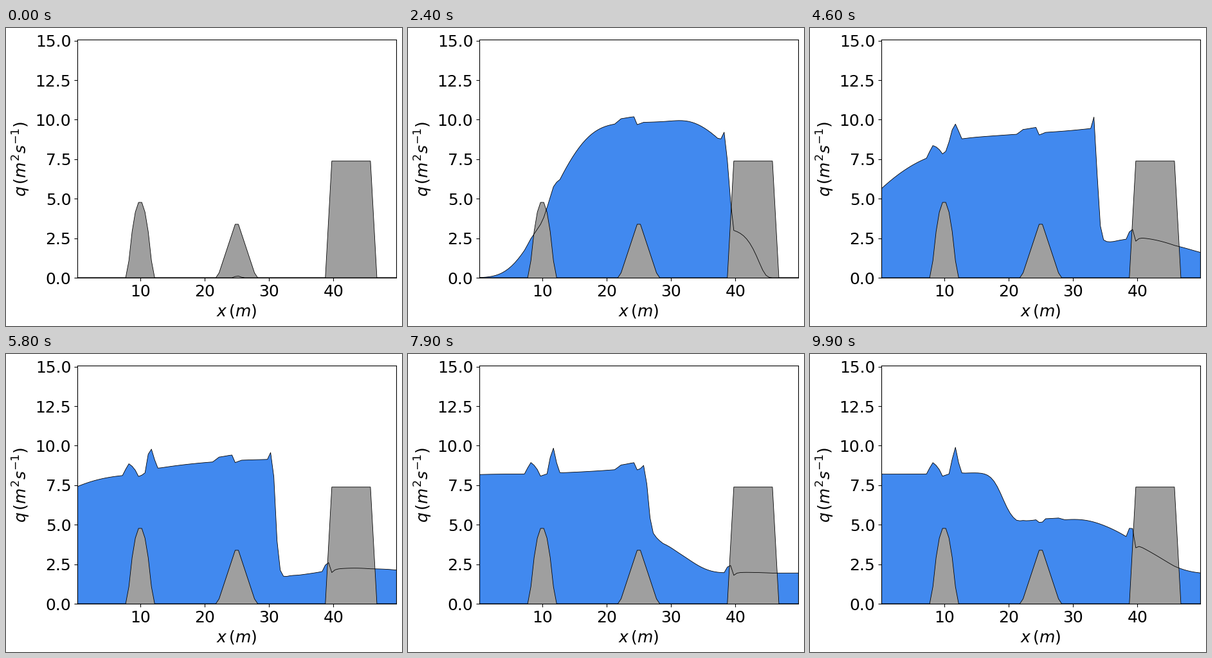
Animation of 616x463 px, one loop 10 s. Source, as a matplotlib script:

```python
"""Dam break over three obstacles: unit discharge from a 1D shallow water solver."""
import numpy as np
import matplotlib.pyplot as plt
from matplotlib.animation import FuncAnimation

W, H, DPI = 616, 463, 100
FRAMES, INTERVAL = 100, 100
G, MANNING, CFL, DRY = 9.80665, 0.02, 0.5, 1e-3
LENGTH, CELLS = 50.0, 100
DX = LENGTH / CELLS
BED_SCALE = 2.46
BLUE, GRAY = "#4189ef", "#9f9f9f"


def bed(x):
    return np.select(
        [(x > 8) & (x < 12), (x >= 22) & (x <= 28), (x > 39) & (x < 46.5)],
        [2 - 0.5 * (x - 10) ** 2, 1.5 - 0.5 * np.abs(x - 25), 3.0], 0.0)


def cell_mean(nodes):
    return (nodes[:-1] + nodes[1:]) / 2


def velocity(h, q):
    return np.where(h > DRY, q / np.maximum(h, DRY), 0.0)


def friction(h, q, dt):
    depth = np.maximum(h, DRY)
    u = velocity(h, q)
    drag = G * MANNING ** 2 / np.cbrt(depth) * np.abs(u)
    return q - dt * drag * u / (1 + 2 * dt * drag / depth)


def hll(hl, ul, hr, ur):
    """Mass and momentum flux between two states."""
    al, ar = np.sqrt(G * hl), np.sqrt(G * hr)
    a_mid = np.abs((al + ar) / 2 + (ul - ur) / 4)
    u_mid = (ul + ur) / 2 + al - ar
    sl = np.where(hl <= DRY, ur - 2 * ar, np.minimum(ul - al, u_mid - a_mid))
    sr = np.where(hr <= DRY, ul + 2 * al, np.maximum(ur + ar, u_mid + a_mid))
    wet = (hl > DRY) | (hr > DRY)
    width = np.where(sr - sl > 1e-9, sr - sl, 1.0)

    def flux(fl, fr, jump):
        mid = (sr * fl - sl * fr + sl * sr * jump) / width
        return np.where(wet, np.where(sl >= 0, fl, np.where(sr <= 0, fr, mid)), 0.0)

    ql, qr = hl * ul, hr * ur
    mass = flux(ql, qr, hr - hl)
    momentum = flux(ql * ul + G / 2 * hl ** 2, qr * ur + G / 2 * hr ** 2, qr - ql)
    return mass, momentum


def step(h, q, z, dt):
    hg, qg, zg = (np.pad(a, 1, mode="edge") for a in (h, q, z))
    qg = friction(hg, qg, dt)
    eta, u = hg + zg, velocity(hg, qg)

    # hydrostatic reconstruction at every face
    face = np.maximum(zg[:-1], zg[1:])
    hl = np.maximum(0, eta[:-1] - face)
    hr = np.maximum(0, eta[1:] - face)
    mass, momentum = hll(hl, u[:-1], hr, u[1:])

    z_east = np.minimum(face, eta[:-1])[1:]
    z_west = np.minimum(face, eta[1:])[:-1]
    slope = G * (hl[1:] + hr[:-1]) / 2 * (z_east - z_west)

    active = np.maximum(np.maximum(hg[:-2], hg[2:]), hg[1:-1]) > DRY
    h = np.maximum(0, h - np.where(active, dt / DX * np.diff(mass), 0))
    q = qg[1:-1] - np.where(active, dt / DX * (np.diff(momentum) + slope), 0)
    q = np.where(h > DRY, q, 0.0)

    wet = h > DRY
    speed = np.abs(velocity(h, q)) + np.sqrt(G * h)
    return h, q, CFL * DX / speed[wet].max()


def simulate():
    nodes = np.linspace(0, LENGTH, CELLS + 1)
    z = cell_mean(bed(nodes))
    h = cell_mean(np.where(nodes <= LENGTH / 2, 6 - bed(nodes), 0.0))
    q = np.zeros(CELLS)
    t, dt, saved = 0.0, 1e-3, []
    while len(saved) < FRAMES:
        t += dt
        h, q, dt = step(h, q, z, dt)
        if t >= 0.1 * len(saved):
            saved.append(q)
    return cell_mean(nodes), z * BED_SCALE, saved


def outline(x, y):
    """Closed area between a curve and zero."""
    return np.column_stack([np.r_[x[0], x, x[-1]], np.r_[0, y, 0]])


x, ground, flow = simulate()

plt.rcParams.update({"font.family": "DejaVu Sans", "font.size": 18})
fig = plt.figure(figsize=((W + 1e-6) / DPI, (H + 1e-6) / DPI), dpi=DPI)
ax = fig.add_axes([111 / W, 75 / H, 496 / W, 369.6 / H])
ax.set_xlim(x[0], x[-1])
ax.set_ylim(0, 15.05)
ax.set_xticks(np.arange(10, 41, 10))
ax.set_yticks(np.arange(0, 15.1, 2.5))
ax.set_xlabel(r"$x \, (m)$")
ax.set_ylabel(r"$q \, (m^2 s^{-1})$")

water, = ax.fill(*outline(x, flow[0]).T, color=BLUE, lw=0, zorder=1)
ax.fill(*outline(x, ground).T, color=GRAY, lw=0, zorder=1.5)
ax.plot(x, ground, color="black", lw=0.6)
surface, = ax.plot(x, flow[0], color="black", lw=0.6)


def update(i):
    water.set_xy(outline(x, flow[i]))
    surface.set_ydata(flow[i])
    return water, surface


anim = FuncAnimation(fig, update, frames=FRAMES, interval=INTERVAL,
                     repeat=True, repeat_delay=0)
plt.show()
```
